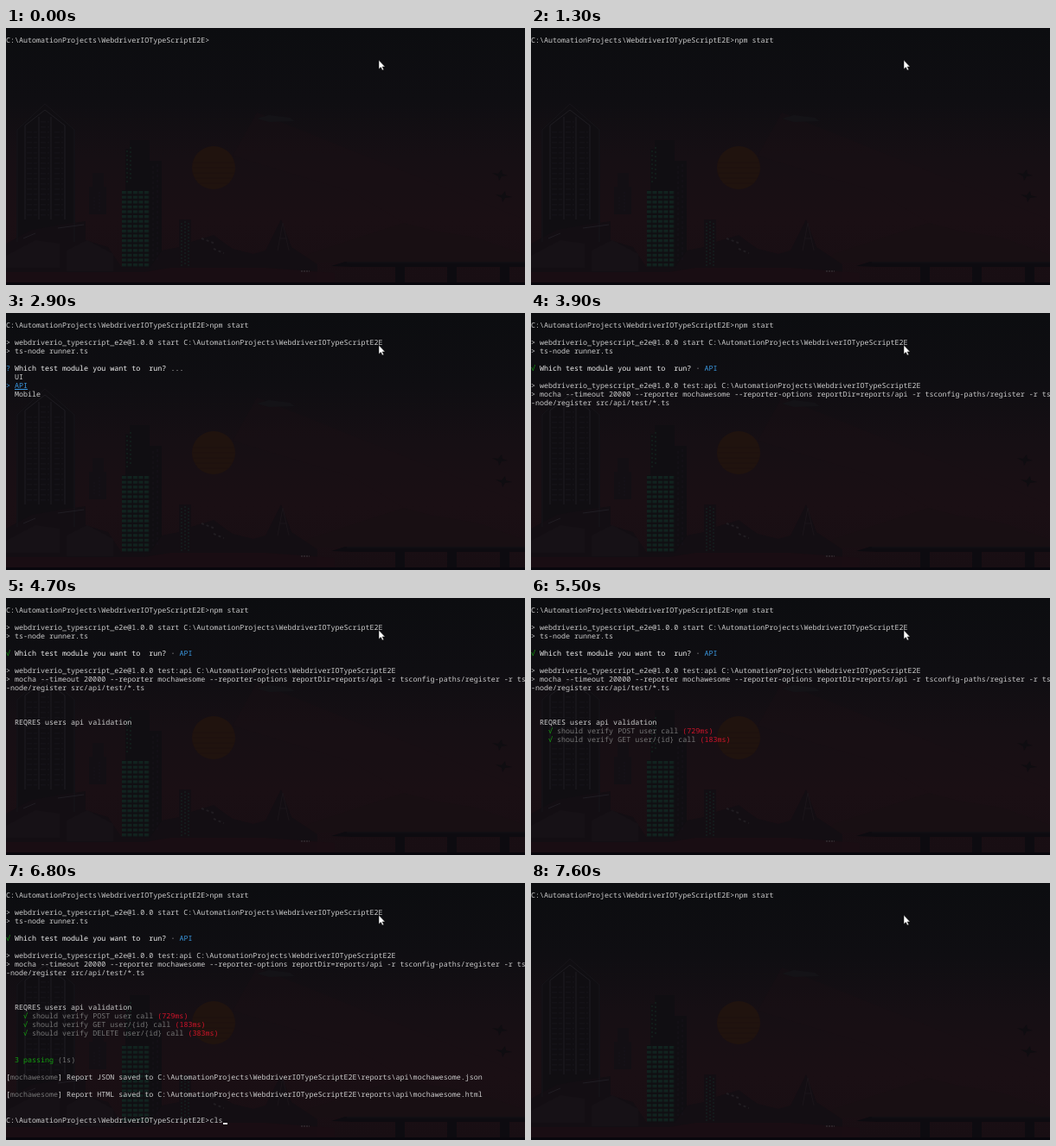
An HTML page for the animation above (8000 ms loop, 600 by 298 pixels).

```html
<!DOCTYPE html>
<html lang="en">
<head>
<meta charset="utf-8">
<title>Terminal test run</title>
<style>
  html, body { margin: 0; width: 100%; height: 100%; overflow: hidden; background: #0c0c10; }
  #stage { position: relative; width: 600px; height: 298px; overflow: hidden; }
  svg { position: absolute; left: 0; top: 0; }
  #screen span {
    position: absolute; white-space: pre; color: #ccc;
    font: 8.35px/10px "Noto Sans Mono", "DejaVu Sans Mono", monospace;
    text-rendering: geometricPrecision;
  }
  #screen .white { color: #f2f2f2; }
  #screen .grey { color: #767676; }
  #screen .green { color: #13a10e; }
  #screen .red { color: #d3142a; }
  #screen .cyan { color: #3a96dd; }
  #screen .link { color: #3a96dd; text-decoration: underline; }
  #cursor { position: absolute; width: 5px; height: 2px; background: #e6e6e6; }
</style>
</head>
<body>
<div id="stage">
  <svg width="600" height="298" viewBox="0 0 600 298">
    <defs>
      <linearGradient id="sky" x2="0" y2="1">
        <stop offset="0" stop-color="#0c0d10"/>
        <stop offset=".28" stop-color="#0f0e12"/>
        <stop offset=".5" stop-color="#160f14"/>
        <stop offset=".75" stop-color="#1a0f14"/>
        <stop offset="1" stop-color="#180e13"/>
      </linearGradient>
      <pattern id="panes" x="134" y="189" width="6.5" height="5.6" patternUnits="userSpaceOnUse">
        <rect width="5" height="3.2" fill="#11231f"/>
      </pattern>
      <pattern id="floors" width="8" height="6" patternUnits="userSpaceOnUse">
        <rect width="6" height="1.5" fill="#141217"/>
      </pattern>
    </defs>
    <rect width="600" height="298" fill="url(#sky)"/>
    <path d="M290 98L600 222V258L480 238L400 190L262 148Z" fill="#191114" opacity=".4"/>
    <path d="M290 105l14-4 24 3 6 4-30 1z" fill="#141317"/>
    <path d="M350 262l60-20 50-16 34 9 50 8 56 20v9H340z" fill="#180f13"/>
    <circle cx="240" cy="162" r="25" fill="#20130e"/>
    <path d="M216 156h48M216 162h48M216 168h48M219 174h43M224 180h33" stroke="#1c110f"/>

    <g fill="#100e12">
      <path d="M12 252V118L45 87L80 118V252Z"/>
      <path d="M96 216V184h4v-16h13v16h3v32z" fill="#130f14"/>
      <path d="M134 278V188h4V140h5v-10h23v24h14V278Z"/>
      <path d="M0 250l30-16 34-6 28-4v22l26 8 16 24h32l14-20 20-4V222h14v26l26-8 22 16 24 6 14-4 18-36 12 32 30 20v26H0Z" fill="#130e13"/>
    </g>
    <path d="M13 248V118L45 88L79 118V248" fill="none" stroke="#17151a"/>
    <path d="M22 222V113L45 95L68 113V222M38 222V103M52 222V103" fill="none" stroke="#1f1d22"/>
    <path d="M24 118h12v104H24zM54 118h12v104H54zM40 108h10v114H40z" fill="url(#floors)"/>
    <rect x="134" y="189" width="32" height="89" fill="url(#panes)"/>
    <path d="M140 142v38M144 138v38" stroke="#121c1a" stroke-width="2" stroke-dasharray="2 3"/>
    <path d="M170 160v110M175 158v112" stroke="#17131a" stroke-dasharray="3 3"/>
    <path d="M203 226v50M207 224v52M211 226v50" stroke="#141a1b" stroke-width="2" stroke-dasharray="2 2"/>
    <path d="M102 196v16M108 190v22" stroke="#19151b" stroke-dasharray="2 2"/>
    <path d="M0 264l34-18 28 4v28H0zM70 258l24-12 30 16v20H70z" fill="#161116"/>
    <path d="M60 232l30-4M20 244l14-6" stroke="#201d23"/>
    <path d="M226 244l16 6M240 256l12 5" stroke="#211d22" stroke-width="2" stroke-dasharray="3 3"/>
    <path d="M314 258l6-32 7 32M316 244h9" fill="none" stroke="#1b151a"/>
    <path d="M0 283h160l30-5h110l80 6v11H0z" fill="#1c0e13" opacity=".7"/>
    <path d="M341 282h10" stroke="#2a2328" stroke-width="2" stroke-dasharray="2 1"/>
    <path d="M376 276l16-5h208v6H400zM450 277h11v18h-11zM510 277h11v18h-11zM571 277h11v18h-11z" fill="#0d0b10"/>
    <path d="M394 272h206" stroke="#151116"/>
    <path d="M562 168l7 1 4-5 1 5 6 2-7 1-3 5-1-5zM566 193l7 1 4-5 1 5 7 2-8 1-3 5-1-5z" fill="#0f0d11"/>
    <rect y="295" width="600" height="3" fill="#08070d"/>
  </svg>
  <div id="screen"></div>
  <div id="cursor"></div>
  <svg width="600" height="298" viewBox="0 0 600 298">
    <path d="M431 37.3V47.6L433.4 45.5L435 49L436.7 48.2L435.1 44.9H438.2Z" fill="#fff" stroke="#111" stroke-width=".5"/>
  </svg>
</div>
<script>
  const LOOP = 8000, CELL = 5.01, ROW = 10.03;
  const CLEAR = 6900;
  const dir = 'C:\\AutomationProjects\\WebdriverIOTypeScriptE2E';
  const pkg = '> webdriverio_typescript_e2e@1.0.0 ';
  const PROMPT = 47;
  const screen = document.getElementById('screen');
  const cursor = document.getElementById('cursor');
  const parts = [];

  const rowTop = row => Math.round(10 + row * ROW);

  function put(row, col, text, style, from, to = CLEAR) {
    const el = document.createElement('span');
    el.textContent = text;
    el.className = style;
    el.style.left = col * CELL + 'px';
    el.style.top = rowTop(row) + 'px';
    screen.append(el);
    parts.push({ el, from, to });
  }

  // Each key appears at its own time.
  function type(row, text, times, to) {
    [...text].forEach((ch, i) => put(row, PROMPT + i, ch, '', times[i], to));
  }

  function check(row, text, ms, from) {
    put(row, 4, '√', 'green', from);
    put(row, 6, text, 'grey', from);
    put(row, 7 + text.length, `(${ms}ms)`, 'red', from);
  }

  function report(row, kind, from) {
    put(row, 0, '[', '', from);
    put(row, 1, 'mochawesome', 'grey', from);
    put(row, 12, `] Report ${kind} saved to ${dir}\\reports\\api\\mochawesome.${kind.toLowerCase()}`, '', from);
  }

  put(0, 0, dir + '>', '', 0, LOOP);
  type(0, 'npm start', [200, 300, 500, 600, 700, 800, 900, 1000, 1100]);
  put(0, PROMPT, 'npm start', '', 7200, LOOP);

  put(2, 0, pkg + 'start ' + dir, '', 1800);
  put(3, 0, '> ts-node runner.ts', '', 1800);

  put(5, 0, '?', 'cyan', 2400, 3300);
  put(5, 0, '√', 'green', 3300);
  put(5, 2, 'Which test module you want to  run?', 'white', 2400);
  put(5, 38, '...', '', 2400, 3300);
  put(5, 38, '·', '', 3300);
  put(5, 40, 'API', 'cyan', 3300);

  put(6, 0, '>', 'cyan', 2400, 2700);
  put(6, 2, 'UI', 'link', 2400, 2700);
  put(6, 2, 'UI', '', 2700, 3300);
  put(7, 2, 'API', '', 2400, 2700);
  put(7, 0, '>', 'cyan', 2700, 3300);
  put(7, 2, 'API', 'link', 2700, 3300);
  put(8, 2, 'Mobile', '', 2400, 3300);

  put(7, 0, pkg + 'test:api ' + dir, '', 3900);
  put(8, 0, '> mocha --timeout 20000 --reporter mochawesome --reporter-options reportDir=reports/api -r tsconfig-paths/register -r ts', '', 3900);
  put(9, 0, '-node/register src/api/test/*.ts', '', 3900);

  put(13, 2, 'REQRES users api validation', '', 4700);
  check(14, 'should verify POST user call', 729, 5200);
  check(15, 'should verify GET user/{id} call', 183, 5400);
  check(16, 'should verify DELETE user/{id} call', 383, 5800);
  put(19, 2, '3 passing', 'green', 5800);
  put(19, 12, '(1s)', 'grey', 5800);
  report(21, 'JSON', 5900);
  report(23, 'HTML', 5900);
  put(26, 0, dir + '>', '', 6000);
  type(26, 'cls', [6200, 6600, 6700]);

  // time, row, column; a missing row hides the cursor
  const moves = [
    [0], [100, 0, 47], [200, 0, 48], [300, 0, 49], [500, 0, 50], [600, 0, 51],
    [700, 0, 52], [800, 0, 53], [900, 0, 54], [1000, 0, 55], [1100, 0, 56],
    [1300], [1800, 5, 0], [2400], [6100, 26, 47], [6200, 26, 48],
    [6600, 26, 49], [6700, 26, 50], [6900, 0, 47], [7200, 0, 56], [7600]
  ];

  function draw(t) {
    for (const p of parts) {
      p.el.style.visibility = t >= p.from && t < p.to ? 'visible' : 'hidden';
    }
    const [, row, col] = moves.findLast(m => m[0] <= t);
    cursor.hidden = row === undefined;
    if (!cursor.hidden) {
      cursor.style.left = col * CELL + 'px';
      cursor.style.top = rowTop(row) + 7 + 'px';
    }
  }

  const start = performance.now();
  function tick() {
    draw((performance.now() - start) % LOOP);
    requestAnimationFrame(tick);
  }
  tick();
</script>
</body>
</html>
```
